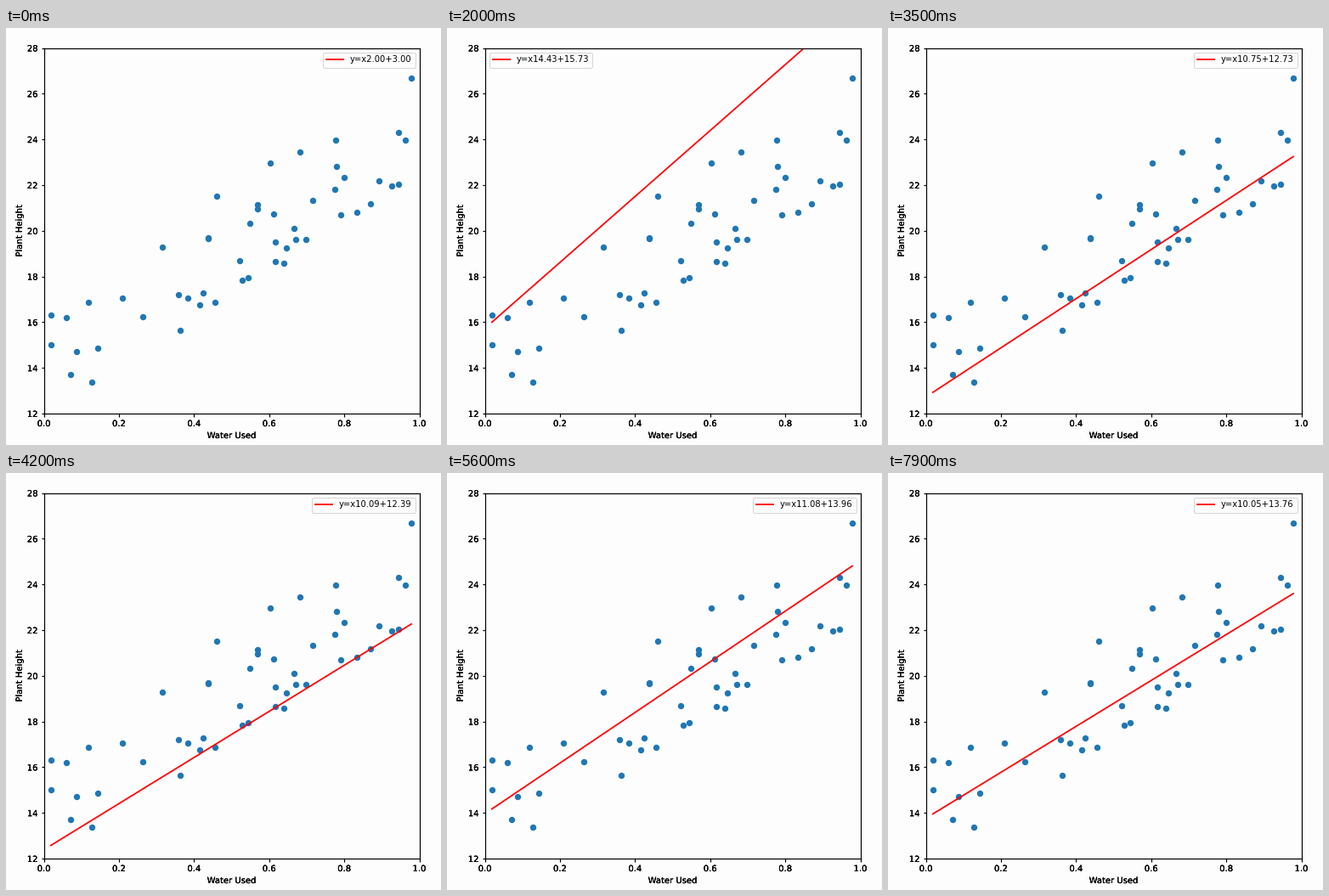
Write a matplotlib script that moves like this. It is 512 px wide and 491 px high and loops after 8 s.

```python
import numpy as np
import matplotlib.pyplot as plt
from matplotlib.animation import FuncAnimation
from matplotlib.patheffects import Normal

W, H, DPI = 512, 491, 64
LEFT, RIGHT, TOP, BOTTOM = 44.5, 486.5, 23.5, 454
FRAMES = 80
PT = 72 / DPI  # one pixel in points
PAPER = "#fefdfe"

plt.rcParams.update({
    "font.family": "DejaVu Sans", "font.size": 10 * PT,
    "axes.linewidth": 1.2 * PT, "axes.labelpad": 4 * PT, "axes.facecolor": PAPER,
    "patch.linewidth": PT, "legend.fontsize": 10 * PT,
})
for axis in ("xtick", "ytick"):
    plt.rcParams.update({f"{axis}.major.size": 3.5 * PT, f"{axis}.major.pad": 3.5 * PT,
                         f"{axis}.major.width": 1.2 * PT})

# Plant height grows linearly with water, plus uniform noise
rng = np.random.RandomState(0)
x = rng.rand(50)
y = 10 * x + 12 + 5 * rng.rand(50)


def adam(steps, rate=1.0, b1=0.9, b2=0.999):
    """Slope and intercept after each Adam step of a least-squares fit."""
    p, mom, var = np.array([2.0, 3.0]), np.zeros(2), np.zeros(2)
    path = [p]
    for t in range(1, steps + 1):
        err = p[0] * x + p[1] - y
        grad = 2 * np.array([np.mean(err * x), np.mean(err)])
        mom = b1 * mom + (1 - b1) * grad
        var = b2 * var + (1 - b2) * grad ** 2
        p = p - rate * (mom / (1 - b1 ** t)) / (np.sqrt(var / (1 - b2 ** t)) + 1e-8)
        path.append(p)
    return np.array(path)


# Playback falls slightly behind the optimiser once the line overshoots
frames = np.arange(FRAMES)
lag = 3.2 * (1 - np.exp(-np.maximum(frames - 10.7, 0) / 36))
path = adam(FRAMES)
slopes, biases = (np.interp(frames - lag, np.arange(len(path)), col) for col in path.T)

fig = plt.figure(figsize=(W / DPI, H / DPI), dpi=DPI, facecolor=PAPER)
ax = fig.add_axes([LEFT / W, 1 - BOTTOM / H, (RIGHT - LEFT) / W, (BOTTOM - TOP) / H])
ax.set(xlim=(0, 1), ylim=(12, 28), xticks=np.linspace(0, 1, 6),
       yticks=range(12, 29, 2), xlabel="Water Used", ylabel="Plant Height")
ax.scatter(x, y, s=43.5, color="#1f77b4", linewidths=1.5 * PT)
ends = np.array([x.min(), x.max()])
line, = ax.plot(ends, ends, color="red", lw=1.8 * PT, label="fit")
legend = ax.legend(loc="best")

# Overprinting gives the axis text its heavier look
for text in [ax.xaxis.label, ax.yaxis.label, *ax.get_xticklabels(), *ax.get_yticklabels()]:
    text.set_path_effects([Normal()] * 3)


def update(n):
    m, b = slopes[n], biases[n]
    line.set_ydata(m * ends + b)
    legend.get_texts()[0].set_text(f"y=x{m:.2f}+{b:.2f}")
    return line, legend


anim = FuncAnimation(fig, update, frames=FRAMES, interval=100, repeat=True, repeat_delay=0)
plt.show()
```
